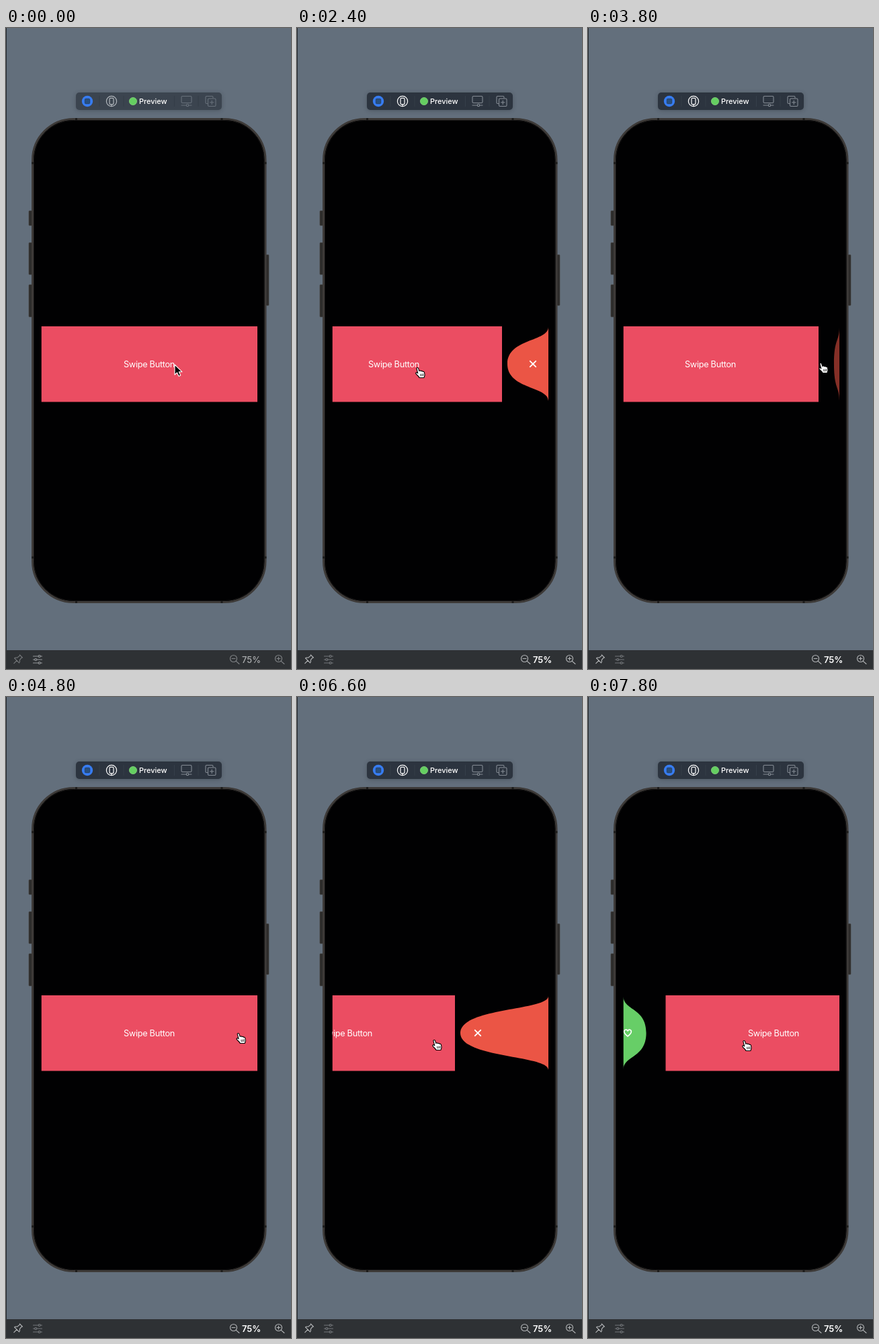
An HTML page for the animation above (8000 ms loop, 424 px wide and 954 px high).

```html
<!DOCTYPE html>
<html lang="en">
<head>
<meta charset="utf-8">
<title>Swipe button preview</title>
<style>
  html, body { margin: 0; width: 100%; height: 100%; overflow: hidden; background: #636f7c; }
  svg { display: block; width: 100%; height: 100%; }
  text { font-family: Inter, "Open Sans", sans-serif; fill: #fff; }
  .line { fill: none; stroke-linecap: round; stroke-linejoin: round; }
</style>
</head>
<body>
<svg viewBox="0 0 424 954">
  <defs>
    <clipPath id="row"><rect x="52.5" y="440" width="321.5" height="120"/></clipPath>
    <filter id="soft" x="-10%" y="-50%" width="120%" height="200%"><feGaussianBlur stdDeviation="3"/></filter>
  </defs>
  <rect width="424" height="954" fill="#636f7c"/>
  <rect width="1" height="926" fill="#22272d"/>

  <!-- top toolbar -->
  <rect x="104" y="97" width="217" height="26" rx="5" fill="#20262e" opacity=".35" filter="url(#soft)"/>
  <rect id="bar" x="104" y="96" width="217" height="26" rx="5"/>
  <path id="dividers" d="M139 101V117M175 101V117M250.500 101V117M286 101V117" stroke-width="1"/>
  <circle cx="121" cy="109" r="8.200" fill="#377cf0"/>
  <rect x="117.300" y="105.300" width="7.400" height="7.400" rx="1.500" fill="#28507f" stroke="#263b5c" stroke-width=".8"/>
  <g id="device" class="line" stroke-width="1.200">
    <circle cx="157" cy="109" r="7.600"/>
    <rect x="154" y="104.300" width="6" height="9.400" rx="1.400"/>
    <path d="M157 113.700V116.500"/>
  </g>
  <circle cx="189" cy="109" r="5.600" fill="#65cf61" stroke="#8bdc83" stroke-width=".7"/>
  <text x="198" y="113" font-size="11" font-weight="500" letter-spacing="-.05">Preview</text>
  <g id="tools" class="line" stroke-width="1.100">
    <rect x="261" y="101.500" width="15" height="10" rx="1.500"/>
    <path d="M261 115H268M272 115H276"/>
    <circle cx="270" cy="115" r="1.700"/>
    <path d="M299.500 112.500H298.500Q297 112.500 297 111V103Q297 101.500 298.500 101.500H306.500Q308 101.500 308 103V104"/>
    <rect x="300.500" y="105" width="11.500" height="11.500" rx="1.500"/>
    <path d="M306.250 108V113.500M303.500 110.750H309"/>
  </g>

  <!-- phone -->
  <g fill="#2d2c2b" stroke="#45423f" stroke-width=".6">
    <rect x="34" y="272" width="4.500" height="22" rx="1"/>
    <rect x="34" y="319.500" width="4.500" height="47.500" rx="1"/>
    <rect x="34" y="382" width="4.500" height="48" rx="1"/>
    <rect x="387" y="337.500" width="4" height="75.500" rx="1"/>
  </g>
  <rect x="39.500" y="135.500" width="346.500" height="719" rx="61" fill="#000" stroke="#3d3a38" stroke-width="3"/>
  <rect x="41.500" y="137.500" width="342.500" height="715" rx="59" fill="#010102" stroke="#151414" stroke-width="1"/>
  <path d="M104.500 134V137M321 134V137M104.500 853V856M321 853V856M38 201H41M384.500 201H387.500M38 788H41M384.500 788H387.500" stroke="#1d1c1b" stroke-width="3"/>

  <!-- swipe row -->
  <g clip-path="url(#row)">
    <path id="red" fill="#eb5545"/>
    <path id="green" fill="#67ce67"/>
    <path id="cross" class="line" d="M-4.200 -4.200L4.200 4.200M4.200 -4.200L-4.200 4.200" stroke="#fff" stroke-width="1.900"/>
    <path id="heart" class="line" d="M0 5C-3 2.700 -5.300 .7 -5.300 -1.900C-5.300 -5.200 -1.600 -6 0 -3C1.600 -6 5.300 -5.200 5.300 -1.900C5.300 .7 3 2.700 0 5Z" stroke="#fff" stroke-width="1.600"/>
    <rect id="button" y="444" height="112.500" fill="#eb4d62"/>
    <text id="label" y="504.800" font-size="12.750" letter-spacing="-.3" text-anchor="middle">Swipe Button</text>
  </g>

  <!-- bottom bar -->
  <rect y="926" width="424" height="28" fill="#2e3134"/>
  <g id="pin" class="line" stroke-width="1.100" transform="translate(17.500 940) rotate(45)">
    <path d="M-3 -7H3M-2 -7L-2.500 -1.500Q-5 0 -5 2H5Q5 0 2.500 -1.500L2 -7M0 2V8"/>
  </g>
  <g id="sliders" class="line" stroke-width="1.200">
    <path d="M40.500 935H48M51.500 935H53.500M40.500 940H42.500M46 940H53.500M40.500 945H48M51.500 945H53.500"/>
    <circle cx="49.700" cy="935" r="1.500"/><circle cx="44.200" cy="940" r="1.500"/><circle cx="49.700" cy="945" r="1.500"/>
  </g>
  <g id="zoom" class="line" stroke-width="1.100">
    <circle cx="338.500" cy="938.500" r="5"/><path d="M342.300 942.300L347 946.500M336 938.500H341"/>
    <circle cx="405.500" cy="938.500" r="5"/><path d="M409.300 942.300L414 946.500M403 938.500H408M405.500 936V941"/>
  </g>
  <text id="percent" x="351" y="944.800" font-size="13">75%</text>

  <!-- pointers -->
  <path id="arrow" d="M0 0V15L3.500 11.800L6 17.300L8.700 16.100L6.300 10.800H11Z" fill="#000" stroke="#fff" stroke-width="1.100" stroke-linejoin="round"/>
  <g id="hand">
    <path d="M-5.200 -6.600C-4.400 -8 -2.800 -7.600 -2.400 -6.300L-1.200 -2.600C0 -3.600 1.300 -3.200 1.700 -2.200C2.800 -3 4 -2.500 4.300 -1.500C5.300 -2 6.300 -1.300 6.500 -.3L7 3C7.200 5 6.200 5.600 6 7.500H-1C-1.600 5.500 -4 4 -5.800 1.800C-7 .4 -5.400 -1 -4 0L-3.200 .8Z" fill="#fff" stroke="#000" stroke-width="1.100" stroke-linejoin="round"/>
    <path class="line" d="M.6 2.200L1 5M2.700 2L3 4.800M4.700 1.700L4.900 4.500" stroke="#000" stroke-width=".8"/>
  </g>
</svg>
<script>
const LOOP = 8000, STEP = 200;
const LEFT = 52.5, RIGHT = 374, TOP = 445, MID = 500, BOTTOM = 555;

// Tracks: [time, value...]
const drag = [[0, 0], [1800, 0], [2400, -69], [2800, -92], [3000, -82], [3200, -69], [3600, -69],
  [3800, -31], [4000, -4], [4200, 0], [5200, 0], [5800, -57], [6600, -139], [6800, -152],
  [7000, -60], [7200, 0], [7400, 0], [7800, 63]];
const reveal = [[0, 1], [3600, 1], [3800, .35], [4000, 0], [4400, 0], [4600, 1], [6800, 1],
  [7000, .35], [7200, 0], [7600, .4], [7800, .62]];
const pointer = [[0, 251, 501], [800, 251, 501], [1000, 249, 509], [1400, 246, 511], [1800, 252, 512],
  [2400, 183, 513], [2800, 160, 513], [3000, 175, 512], [3400, 315, 508], [3600, 350, 506],
  [4600, 350, 506], [5200, 348, 512], [5800, 291, 515], [6600, 208, 518], [6800, 195, 518],
  [7200, 173, 518], [7400, 173, 518], [7800, 236, 519]];

const $ = id => document.getElementById(id);
const clamp = v => Math.max(0, Math.min(1, v));
const set = (id, attrs) => {
  for (const key in attrs) $(id).setAttribute(key, attrs[key]);
};

function at(track, t) {
  const i = track.findIndex(k => k[0] > t);
  if (i < 0) return track[track.length - 1].slice(1);
  const a = track[i - 1], b = track[i];
  const p = (t - a[0]) / (b[0] - a[0]);
  return a.slice(1).map((v, n) => v + (b[n + 1] - v) * p);
}

function bulge(edge, tip) {
  return `M${edge} ${TOP}C${edge} ${TOP + 22} ${tip} ${MID - 38} ${tip} ${MID}` +
    `C${tip} ${MID + 38} ${edge} ${BOTTOM - 22} ${edge} ${BOTTOM}Z`;
}

function drawChrome(active) {
  const tone = (on, off) => active ? on : off;
  set('bar', { fill: tone('#2c343f', '#3b444f') });
  set('dividers', { stroke: tone('#353e49', '#343d47') });
  set('device', { stroke: tone('#ffffff', '#b2b7bd') });
  set('tools', { stroke: tone('#858c95', '#68717b') });
  set('pin', { stroke: tone('#b9bbbd', '#777a7d') });
  set('sliders', { stroke: tone('#73767a', '#94979a') });
  set('zoom', { stroke: tone('#b5b7b9', '#828588') });
  set('percent', { 'font-weight': tone(600, 500), style: `fill:${tone('#fff', '#aaacae')}` });
}

function drawRow(t) {
  const [x] = at(drag, t), [r] = at(reveal, t);
  const width = Math.max(0, Math.abs(x) - 8) * r;
  const isLeft = x < 0;
  set('button', { x: LEFT + Math.max(0, x), width: RIGHT - LEFT - Math.abs(x) });
  set('label', { x: 213 + x });

  const redTip = RIGHT - width, greenTip = LEFT + width;
  const pull = clamp((-x - 95) / 25);
  const crossX = 351 + (redTip + 26 - 351) * pull;
  set('red', { d: bulge(RIGHT, redTip), opacity: isLeft ? clamp(r * 1.6) : 0 });
  set('cross', { transform: `translate(${crossX} ${MID})`, opacity: isLeft ? clamp((width - 20) / 20) : 0 });
  set('green', { d: bulge(LEFT, greenTip), opacity: x > 0 ? 1 : 0 });
  set('heart', { transform: `translate(${Math.min(76, greenTip - 27.5)} ${MID})`, opacity: x > 0 ? 1 : 0 });
}

function drawPointer(t) {
  const [x, y] = at(pointer, t), isHand = t >= 1000;
  const transform = `translate(${x} ${y})`;
  set('arrow', { transform, opacity: isHand ? 0 : 1 });
  set('hand', { transform, opacity: isHand ? 1 : 0 });
}

function render(time) {
  const t = Math.floor((time % LOOP) / STEP) * STEP;
  drawChrome(t >= 800);
  drawRow(t);
  drawPointer(t);
}

const start = performance.now();
function tick() {
  render(performance.now() - start);
  requestAnimationFrame(tick);
}
tick();
</script>
</body>
</html>
```
